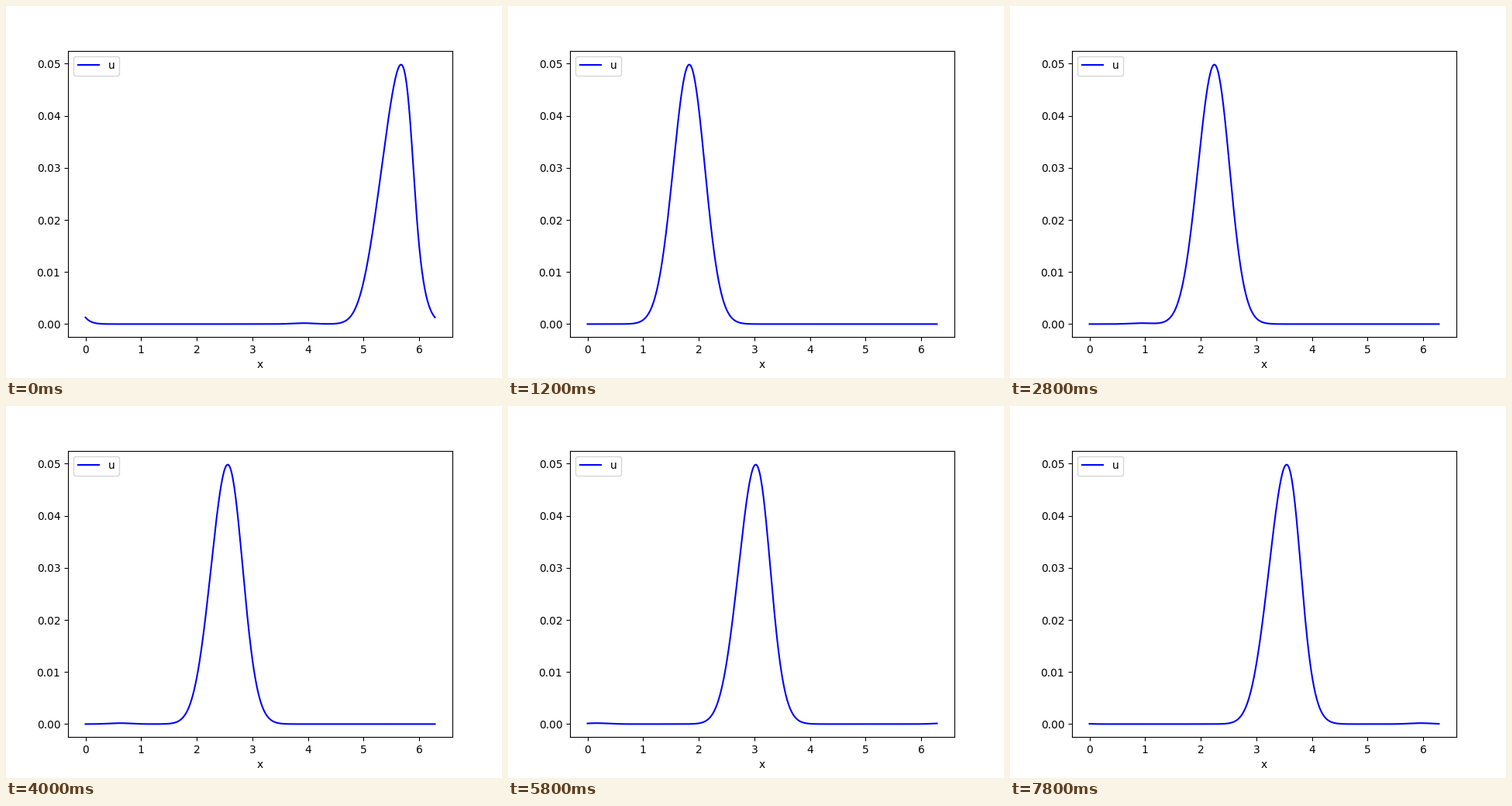
Animation of 640x480 px, one loop 8000 ms. Source, as a matplotlib script:

```python
import numpy as np
import matplotlib.pyplot as plt
from matplotlib.animation import FuncAnimation

FRAMES = 40        # frames in one loop
STEPS = 80         # steps in the full run; the loop opens on its last step
DT = 0.0499        # travel per step at unit wave speed
HEIGHT = 0.05
WIDTH = 0.4
START = np.pi / 2
STEEPEN = 0.82     # extra speed per unit of height
ECHO = 0.072       # share of the squared pulse that runs backwards
PERIOD = 2 * np.pi

x = np.linspace(0, PERIOD, 513)
x0 = np.linspace(START - np.pi, START + np.pi, 2049)[:-1]
pulse = HEIGHT * np.exp(-((x0 - START) / WIDTH) ** 2)
echo = ECHO * pulse ** 2
main = pulse - echo


def wave(t):
    """Steepening pulse moving right plus its faint echo moving left."""
    right = np.interp(x, x0 + t * (1 + STEEPEN * main), main, period=PERIOD)
    left = np.interp(x, x0 - t, echo, period=PERIOD)
    return right + left


plt.rcParams["font.family"] = "DejaVu Sans"
fig, ax = plt.subplots(figsize=(6.4, 4.8), dpi=100)
line, = ax.plot(x, wave(0), color="blue", linewidth=1.5, label="u")
ax.set_xlim(-0.05 * PERIOD, 1.05 * PERIOD)
ax.set_ylim(-0.05 * HEIGHT, 1.05 * HEIGHT)
ax.set_xlabel("x")
ax.legend(loc="upper left")


def draw(i):
    line.set_ydata(wave(DT * ((i - 1) % STEPS)))
    return line,


anim = FuncAnimation(fig, draw, frames=FRAMES, interval=200, repeat=True)
plt.show()
```
